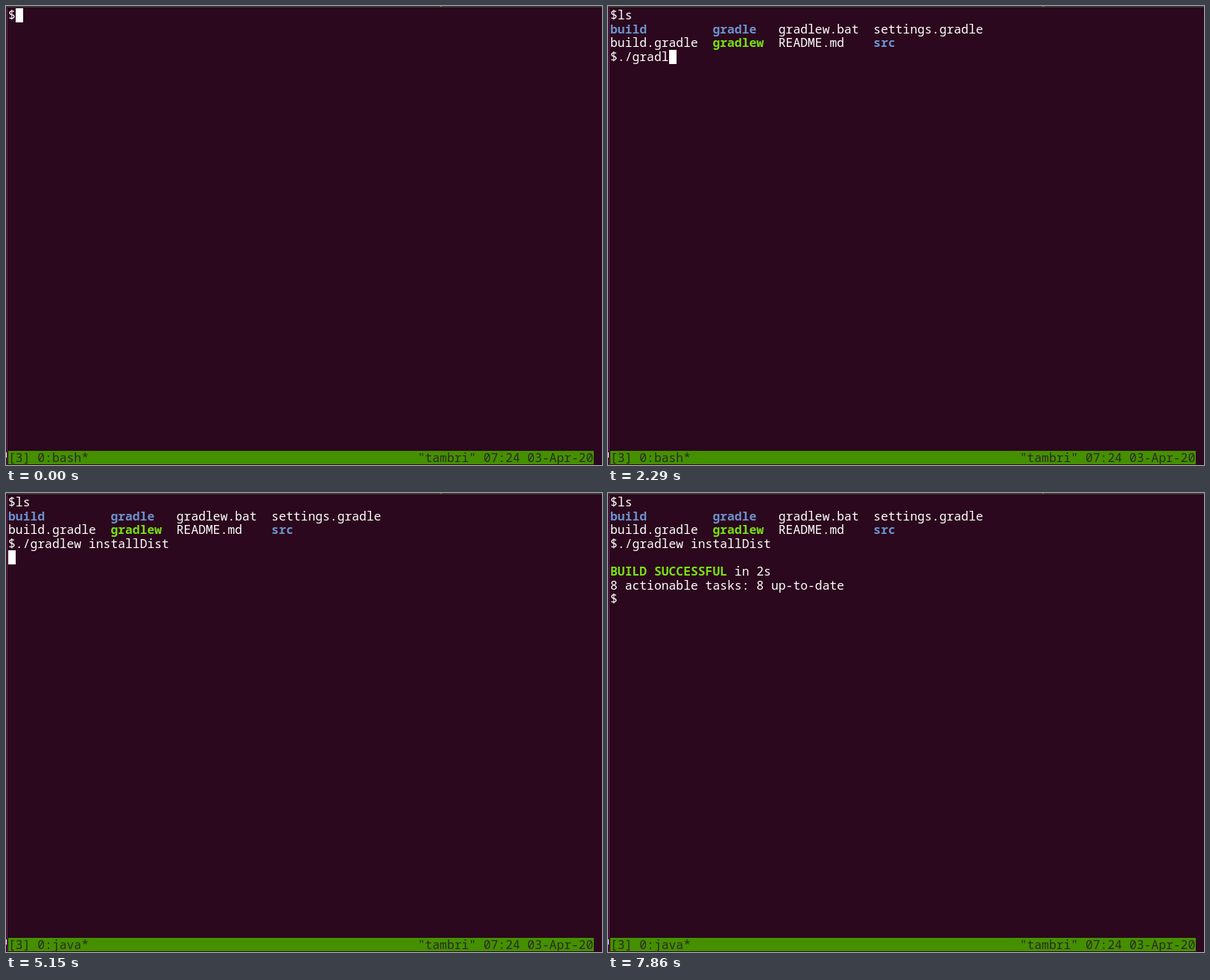
An HTML page with a canvas for the animation above (8 s loop, 800x617 px).

```html
<!DOCTYPE html>
<html lang="en">
<head>
<meta charset="utf-8">
<title>Terminal build</title>
<style>
html, body { margin: 0; width: 100%; height: 100%; overflow: hidden; background: #2b081d; }
canvas { display: block; }
</style>
</head>
<body>
<canvas id="screen" width="800" height="617"></canvas>
<script>
const ctx = document.getElementById('screen').getContext('2d');
const LOOP = 8000, TICK = 1000 / 7;
const LEFT = 3, TOP = 3, CELL_W = 9.815, CELL_H = 18.6;
const WHITE = '#fff', BLUE = '#6b92cc', LIME = '#78e012', GREEN = '#459000', DARK = '#2a2b20';

function rect(x, y, w, h, color) {
  ctx.fillStyle = color;
  ctx.fillRect(x, y, w, h);
}

// Each character sits in its own cell of the terminal grid.
function print(row, col, text, color = WHITE, bold = false) {
  ctx.font = `${bold ? 'bold ' : ''}16.36px "Noto Sans Mono", "DejaVu Sans Mono", monospace`;
  ctx.fillStyle = color;
  [...text].forEach((ch, i) =>
    ctx.fillText(ch, LEFT + (col + i) * CELL_W, TOP + row * CELL_H + 15.2));
}

function cursor(row, col) {
  rect(Math.round(LEFT + col * CELL_W), Math.round(TOP + row * CELL_H), 10, 19, WHITE);
}

function typed(text, tick, start, pace) {
  return text.slice(0, Math.max(0, Math.floor((tick - start) / pace) + 1));
}

function drawWindow(program) {
  rect(0, 0, 800, 617, '#2b081d');
  rect(0, 0, 800, 2, '#3a3736');
  rect(583, 0, 2, 1, '#c4552d');
  rect(1, 3, 1, 614, '#642a5c');
  rect(0, 600, 1, 7, '#ddd');
  rect(3, 598, 786, 18, GREEN);
  print(32, 0, `[3] 0:${program}*`, DARK);
  print(32, 56, '"tambri" 07:24 03-Apr-20', DARK);
}

function drawListing() {
  print(1, 0, 'build', BLUE, true);
  print(1, 14, 'gradle', BLUE, true);
  print(1, 23, 'gradlew.bat');
  print(1, 36, 'settings.gradle');
  print(2, 0, 'build.gradle');
  print(2, 14, 'gradlew', LIME, true);
  print(2, 23, 'README.md');
  print(2, 36, 'src', BLUE, true);
}

function drawProgress(tick) {
  const ms = 9 + 100 * Math.floor((tick * TICK - 5451) / 100);
  const elapsed = ms < 1000 ? ms + 'ms' : '1s';
  print(4, 0, `<-------------> 0% CONFIGURING [${elapsed}]`, WHITE, true);
  print(5, 0, '> root project', WHITE, true);
}

function drawResult(tick) {
  print(5, 0, 'BUILD SUCCESSFUL', LIME, true);
  print(5, 17, 'in 2s');
  print(6, 0, '8 actionable tasks: 8 up-to-date');
  if (tick >= 55) print(7, 0, '$');
}

function draw(tick) {
  drawWindow(tick < 36 ? 'bash' : 'java');
  const first = '$' + typed('ls', tick, 2, 1);
  print(0, 0, first);
  if (tick < 6) return cursor(0, first.length);

  drawListing();
  const second = '$' + typed('./', tick, 8, 2) + typed('gradlew ', tick, 11, 1.25)
    + typed('installDist', tick, 24, 0.875);
  print(3, 0, second);
  if (tick < 34) return cursor(3, second.length);

  const building = tick >= 39 && tick < 54;
  if (building) drawProgress(tick);
  if (tick >= 54) drawResult(tick);
  const blinkOn = Math.floor((tick - 34) / 4.15) % 2 === 0;
  if (blinkOn) cursor(tick < 39 ? 4 : building ? 6 : 7, 0);
}

const start = performance.now();
function frame() {
  const time = (performance.now() - start) % LOOP;
  draw(Math.min(55, Math.floor((time + 5) / TICK)));
  requestAnimationFrame(frame);
}
frame();
</script>
</body>
</html>
```
